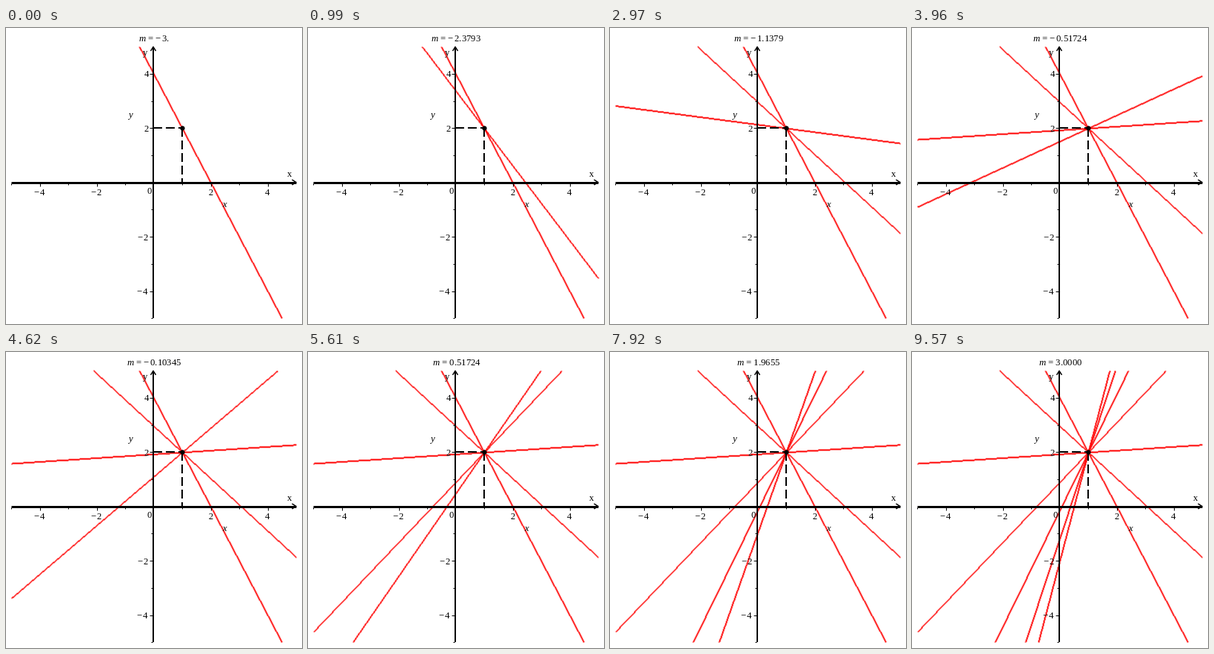
A matplotlib script that plays this animation: 400x400 px, repeating every 9900 ms.

```python
import matplotlib.pyplot as plt
import numpy as np
from matplotlib.animation import FuncAnimation

SIZE, DPI = 400, 100
FRAMES, INTERVAL = 30, 330
TRACE_STEP = 5
X0, Y0 = 199.5, 208.75   # origin in pixels
UX, UY = 38.5, 36.7      # pixels per unit
PX, PY = 1, 2            # common point of all lines

plt.rcParams.update({
    "font.family": "Liberation Serif",
    "mathtext.fontset": "custom",
    "mathtext.rm": "Liberation Serif",
    "mathtext.it": "Liberation Serif:italic",
})

fig = plt.figure(figsize=(SIZE / DPI, SIZE / DPI), dpi=DPI, facecolor="white")
ax = fig.add_axes([0, 0, 1, 1])
ax.set_xlim(0, SIZE)
ax.set_ylim(SIZE, 0)
ax.axis("off")


def pt(px):
    return px * 72 / DPI


def sx(x):
    return X0 + UX * x


def sy(y):
    return Y0 - UY * y


def stroke(xs, ys, width=2, **kw):
    ax.plot(xs, ys, color="black", lw=pt(width), zorder=3,
            solid_capstyle="butt", dash_capstyle="butt", **kw)


def label(x, y, text, ha="center", size=12.7):
    return ax.text(x, y, text, ha=ha, va="baseline", fontsize=pt(size), zorder=5)


def number(text):
    return text.replace("-", "\u2212$\\,$")


def slope(i):
    return -2 + 6 * i / (FRAMES - 1)


def red_line(s):
    """Crisp line, two pixels thick, through the common point."""
    ends = sorted((PX + (-5 - PY) / s, PX + (5 - PY) / s))
    x = np.array([max(-5, ends[0]), min(5, ends[1])])
    along, across = sx(x), sy(PY + s * (x - PX))
    fill = ax.fill_between
    if abs(s) * UY > UX:
        along, across = across, along
        fill = ax.fill_betweenx
    order = np.argsort(along)
    along, across = along[order], across[order]
    steps = np.arange(round(along[0]), round(along[1]) + 1)
    mid = np.round(np.interp(steps + 0.5, along, across))
    return fill(steps, mid - 1, mid + 1, step="post", color="red",
                linewidth=0, zorder=2)


# Axes with open arrowheads
stroke([7, 392], [208.5, 208.5], 3)
stroke([199, 199], [25, 392])
stroke([386.5, 392, 386.5], [205, 208.5, 212], 1.5)
stroke([195.5, 199, 202.5], [31, 25.5, 31], 1.5)

# Ticks and their numbers
for k in range(-5, 6):
    if k == 0:
        continue
    length = 4 if k % 2 == 0 else 2
    if k < 5:
        stroke([sx(k)] * 2, [210, 210 + length], 1)
        stroke([198 - length, 198], [sy(k)] * 2, 1)
    if k % 2 == 0:
        label(sx(k), 226, number(str(k)))
        label(193, sy(k) + 4.5, number(str(k)), ha="right")

label(194, 224, "0")
label(383.5, 201, "x")
label(188, 37, "y")
label(168, 121, "$y$")
label(296, 242, "$x$")

# Dashed guides and the fixed point
stroke([199, 238], [135, 135], dashes=(6, 2.5))
stroke([238, 238], [135, 208], dashes=(6, 2.5))
ax.plot([238], [135.3], "o", color="black", ms=pt(6.3), mew=0, zorder=4)

lines = [red_line(slope(i)) for i in range(FRAMES)]
title = label(200.5, 18, "")


def update(i):
    # Every fifth line stays on screen once it has been reached
    for k, line in enumerate(lines):
        line.set_visible(k == i or (k < i and k % TRACE_STEP == 0))
    value = "-3." if i == 0 else f"{slope(i) - 1:#.5g}"
    title.set_text("$m$ = " + number(value))
    return [*lines, title]


anim = FuncAnimation(fig, update, frames=FRAMES, interval=INTERVAL,
                     init_func=lambda: update(0), repeat=True, repeat_delay=0)
plt.show()
```
